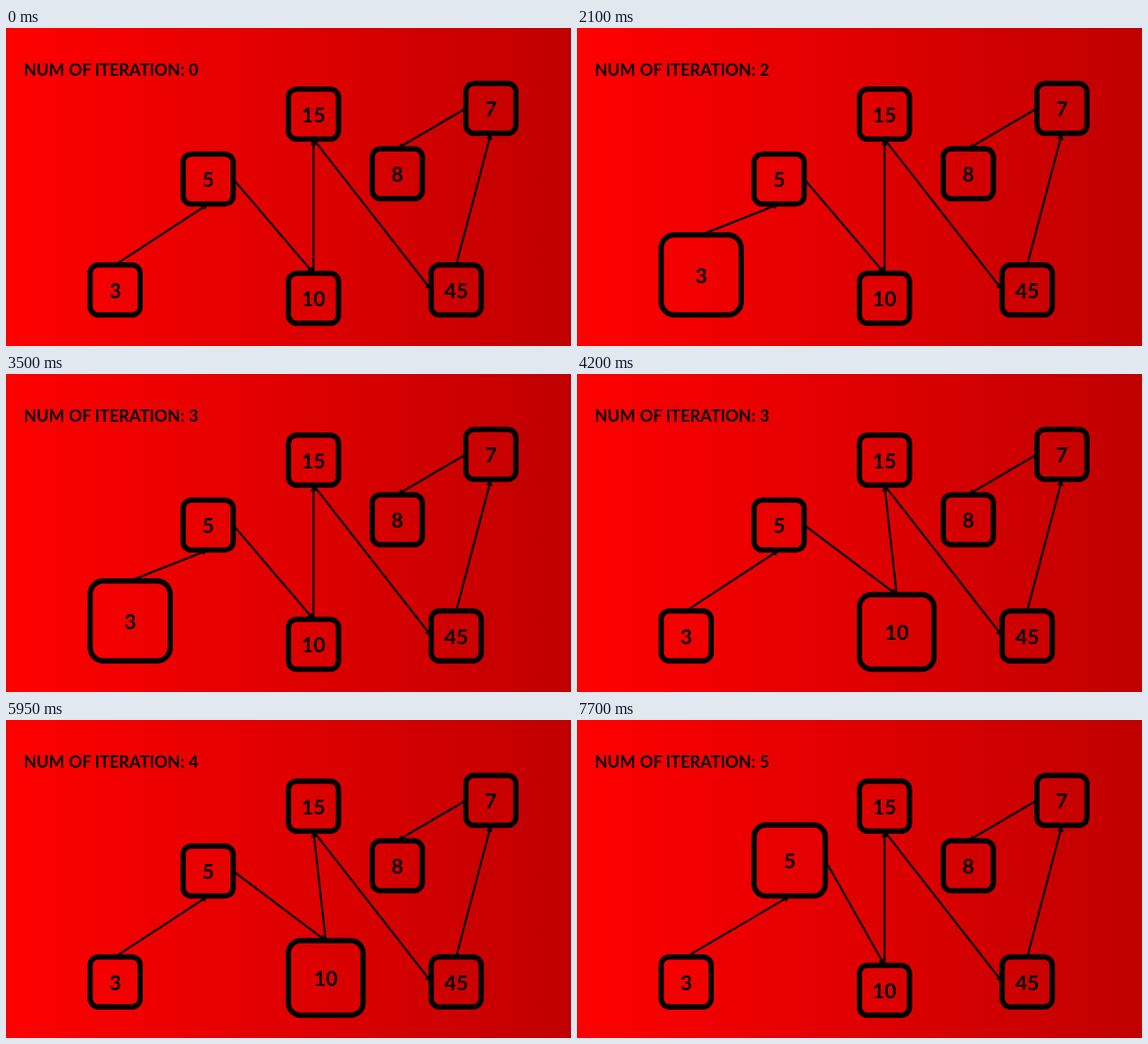
Animation of 640 by 360 pixels, one loop 8 s. Source, as an HTML page:

```html
<!DOCTYPE html>
<html lang="en">
<head>
<meta charset="utf-8">
<title>Linked list traversal</title>
<style>
  html, body { margin: 0; width: 100%; height: 100%; overflow: hidden; }
  svg {
    display: block; width: 640px; height: 360px;
    background: linear-gradient(90deg, #ff0000, #c00000);
  }
  text { font-family: Lato, sans-serif; font-weight: 700; fill: #000; }
  .title { font-size: 18.6px; }
  .value { font-size: 23.3px; text-anchor: middle; }
  .box { fill: none; stroke: #000; stroke-width: 6; }
  .link { stroke: #000; stroke-width: 2.3; }
</style>
</head>
<body>
<svg id="stage" viewBox="0 0 640 360">
  <text class="title" y="54"><tspan x="20.3">NUM</tspan> <tspan x="71.2">OF</tspan> <tspan x="100.5">ITERATION:</tspan> <tspan x="207" id="count">0</tspan></text>
</svg>
<script>
const STEP = 350, LOOP = 8000, SMALL = 56.7;

// Resting centre, enlarged size, and whether the box grows downwards.
const nodes = [
  { value: 3, x: 123.7, y: 296.5, big: 90.7 },
  { value: 5, x: 229, y: 171, big: 80.7 },
  { value: 10, x: 348.3, y: 306, big: 84.5 },
  { value: 15, x: 348.3, y: 97.5, big: 84.5, down: true },
  { value: 45, x: 510, y: 296.5, big: 84.5 },
  { value: 7, x: 549.3, y: 91 },
  { value: 8, x: 443.3, y: 165 }
];

// Side left and side entered for each link between neighbours.
const sides = [
  ["top", "bottom"], ["right", "top"], ["top", "bottom"],
  ["bottom", "left"], ["top", "bottom"], ["left", "top"]
];
const offset = { top: [0, -1], bottom: [0, 1], left: [-1, 0], right: [1, 0] };

// Each pass rests, then visits one node more than the pass before it.
const steps = [];
for (let pass = 0; pass <= 5; pass++) {
  steps.push({ pass, active: -1 });
  for (let i = 0; i <= Math.min(pass, 4); i++) steps.push({ pass, active: i });
}

const stage = document.getElementById("stage");
const count = document.getElementById("count");

function set(el, attrs) {
  for (const name in attrs) el.setAttribute(name, attrs[name]);
}

function add(tag, className) {
  const el = document.createElementNS("http://www.w3.org/2000/svg", tag);
  if (className) set(el, { class: className });
  return stage.appendChild(el);
}

const links = sides.map(() => ({ line: add("line", "link"), head: add("path") }));
for (const node of nodes) {
  node.box = add("rect", "box");
  node.label = add("text", "value");
  node.label.textContent = node.value;
}

function place(node, grown) {
  const size = grown ? node.big : SMALL;
  const shift = (size - SMALL) / 2;
  const cx = node.x + shift;
  const cy = node.y + (node.down ? shift : -shift);
  set(node.box, {
    x: cx - size / 2, y: cy - size / 2, width: size, height: size, rx: size / 6
  });
  set(node.label, { x: cx, y: cy + 9 });
  return { cx, cy, half: size / 2 };
}

function anchor(area, side) {
  const [dx, dy] = offset[side];
  return [area.cx + dx * area.half, area.cy + dy * area.half];
}

function connect({ line, head }, [x1, y1], [x2, y2]) {
  const angle = Math.atan2(y2 - y1, x2 - x1);
  set(line, { x1, y1, x2: x2 - 5 * Math.cos(angle), y2: y2 - 5 * Math.sin(angle) });
  set(head, {
    d: "M0 0L-7 -3.5V3.5Z",
    transform: `translate(${x2} ${y2}) rotate(${angle * 180 / Math.PI})`
  });
}

function draw({ pass, active }) {
  count.textContent = pass;
  const areas = nodes.map((node, i) => place(node, i === active));
  links.forEach((link, i) => {
    const [from, to] = sides[i];
    connect(link, anchor(areas[i], from), anchor(areas[i + 1], to));
  });
}

const start = performance.now();
let shown = -1;

function tick() {
  const index = Math.floor(((performance.now() - start) % LOOP) / STEP);
  if (index !== shown) draw(steps[shown = index]);
  requestAnimationFrame(tick);
}
tick();
</script>
</body>
</html>
```
